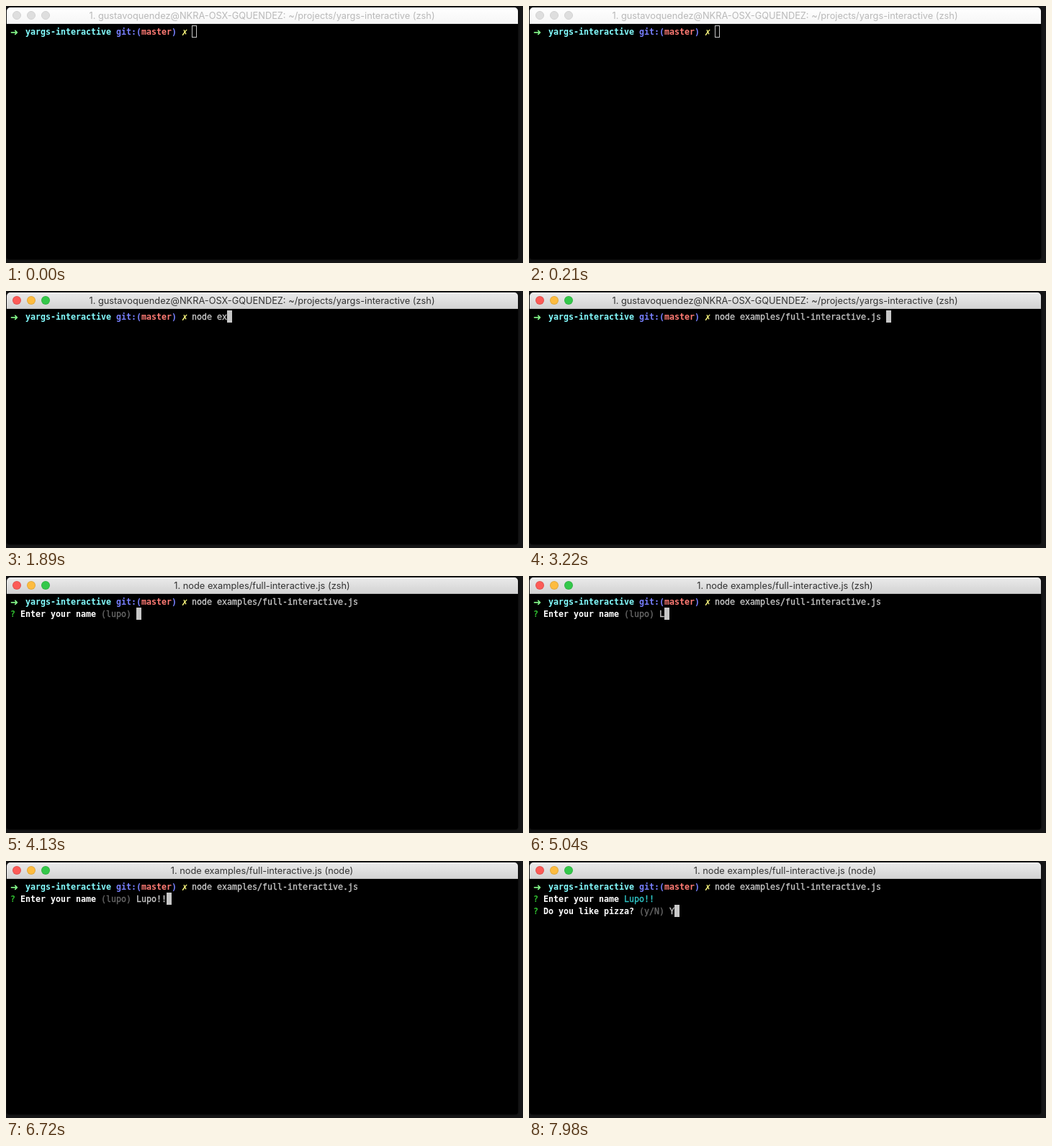
An HTML page that plays this animation: 718 px wide and 358 px high, repeating every 8000 ms.

```html
<!DOCTYPE html>
<html lang="en">
<head>
<meta charset="utf-8">
<title>Terminal session</title>
<style>
  html, body { margin: 0; width: 100%; height: 100%; overflow: hidden; background: #161617; }
  #win {
    position: absolute; left: 1px; top: 2px; width: 710px; height: 351px;
    overflow: hidden; background: #000; border-radius: 5px 5px 4px 4px;
    box-shadow: 0 0 3px #000;
  }
  #bar {
    position: absolute; left: 0; top: 0; width: 710px; height: 23px;
    box-sizing: border-box; border-bottom: 1px solid #bdbdbd;
    background: linear-gradient(#ebebeb, #d3d3d3);
  }
  #title {
    position: absolute; left: 0; top: 0; width: 709px; text-align: center;
    font: 12.8px/23px Inter, "Open Sans", sans-serif; color: #333; white-space: pre;
  }
  .light {
    position: absolute; top: 5px; width: 12px; height: 12px; border-radius: 50%;
    box-sizing: border-box; border: 1px solid rgba(0, 0, 0, .1);
  }
  .idle #bar { background: linear-gradient(#fff, #f6f6f6); border-color: #e2e2e2; }
  .idle #title { color: #b9b9b9; }
  .idle .light { background: #dedede !important; border-color: #d2d2d2; }
  #screen span, #cursor { position: absolute; height: 17px; }
  #screen span {
    font: 11.63px/19px "DejaVu Sans Mono", "Liberation Mono", monospace;
    white-space: pre; color: #c7c7c7; -webkit-text-stroke: .35px;
  }
  #screen .b { font-weight: bold; -webkit-text-stroke: 0; }
  #cursor { width: 7px; background: #c7c7c7; }
  .idle #cursor { background: none; box-sizing: border-box; border: 1px solid #c7c7c7; }
</style>
</head>
<body>
<div id="win">
  <div id="bar">
    <i class="light" style="left:8px;background:#fc5b57"></i>
    <i class="light" style="left:28px;background:#fdbc40"></i>
    <i class="light" style="left:48px;background:#34c84a"></i>
    <div id="title"></div>
  </div>
  <div id="screen"></div>
  <div id="cursor"></div>
</div>
<script>
const LOOP = 8000, CELL = 7, ROW = 17, LEFT = 5, TOP = 25;
const FOCUS = 420, RUN = 3570, ASK = 4130, ANSWER = 7000;
const GREEN = '#2fc02f', CYAN = '#2fc5c7', DIM = '#686868', WHITE = '#fff';

const titles = [
  [0, '1. gustavoquendez@NKRA-OSX-GQUENDEZ: ~/projects/yargs-interactive (zsh)'],
  [RUN, '1. node examples/full-interactive.js (zsh)'],
  [5250, '1. node examples/full-interactive.js (node)']
];
// Typed text: [time, number of characters shown]
const command = 'node examples/full-interactive.js ';
const commandKeys = [
  [0, 0], [910, 1], [1050, 2], [1190, 3], [1260, 4], [1400, 5], [1540, 6], [1680, 7],
  [2170, 14], [2660, 15], [2800, 16], [3010, 34]
];
const name = 'Lupo!!';
const nameKeys = [[0, 0], [5040, 1], [5180, 2], [5320, 3], [5460, 4], [6090, 5], [6300, 6]];
const pizzaKeys = [[0, ''], [7700, 'Y']];

// Runs of a row: [text, colour, bold, font size]
const prompt = [
  ['➜', '#84fb8a', 1, 18], ['  '], ['yargs-interactive', '#84fdff', 1], [' '],
  ['git:(', '#7880ff', 1], ['master', '#ff7b74', 1], [')', '#7880ff', 1], [' '],
  ['✗', '#fffc80', 1, 14], [' ']
];
const question = (text, hint) => [
  ['?', GREEN, 1], [' '], [text, WHITE, 1], [' '], ...(hint ? [[hint, DIM], [' ']] : [])
];

const win = document.getElementById('win');
const title = document.getElementById('title');
const screen = document.getElementById('screen');
const cursor = document.getElementById('cursor');

const at = (steps, t) => steps.filter(s => s[0] <= t).pop()[1];
const typed = (text, keys, t) => text.slice(0, at(keys, t));

function rowsAt(t) {
  const rows = [[...prompt, [typed(command, commandKeys, t)]]];
  if (t >= ANSWER) {
    rows.push([...question('Enter your name'), [name, CYAN]]);
    rows.push([...question('Do you like pizza?', '(y/N)'), [at(pizzaKeys, t)]]);
  } else if (t >= ASK) {
    rows.push([...question('Enter your name', '(lupo)'), [typed(name, nameKeys, t)]]);
  } else if (t >= RUN) {
    rows.push([]);
  }
  return rows;
}

function place(el, col, row) {
  el.style.left = LEFT + col * CELL + 'px';
  el.style.top = TOP + row * ROW + 'px';
}

function draw(rows) {
  screen.textContent = '';
  rows.forEach((runs, row) => {
    let col = 0;
    for (const [text, color, bold, size] of runs) {
      if (text.trim()) {
        const span = document.createElement('span');
        span.textContent = text;
        if (color) span.style.color = color;
        if (bold) span.className = 'b';
        if (size) span.style.fontSize = size + 'px';
        place(span, col, row);
        screen.append(span);
      }
      col += text.length;
    }
    place(cursor, col, row);
  });
}

let shown = '';
function frame(now) {
  const t = now % LOOP;
  const rows = rowsAt(t), heading = at(titles, t), idle = t < FOCUS;
  const key = JSON.stringify([rows, heading, idle]);
  if (key !== shown) {
    shown = key;
    win.className = idle ? 'idle' : '';
    title.textContent = heading;
    draw(rows);
  }
}

const start = performance.now();
function tick() {
  frame(performance.now() - start);
  requestAnimationFrame(tick);
}
tick();
</script>
</body>
</html>
```
